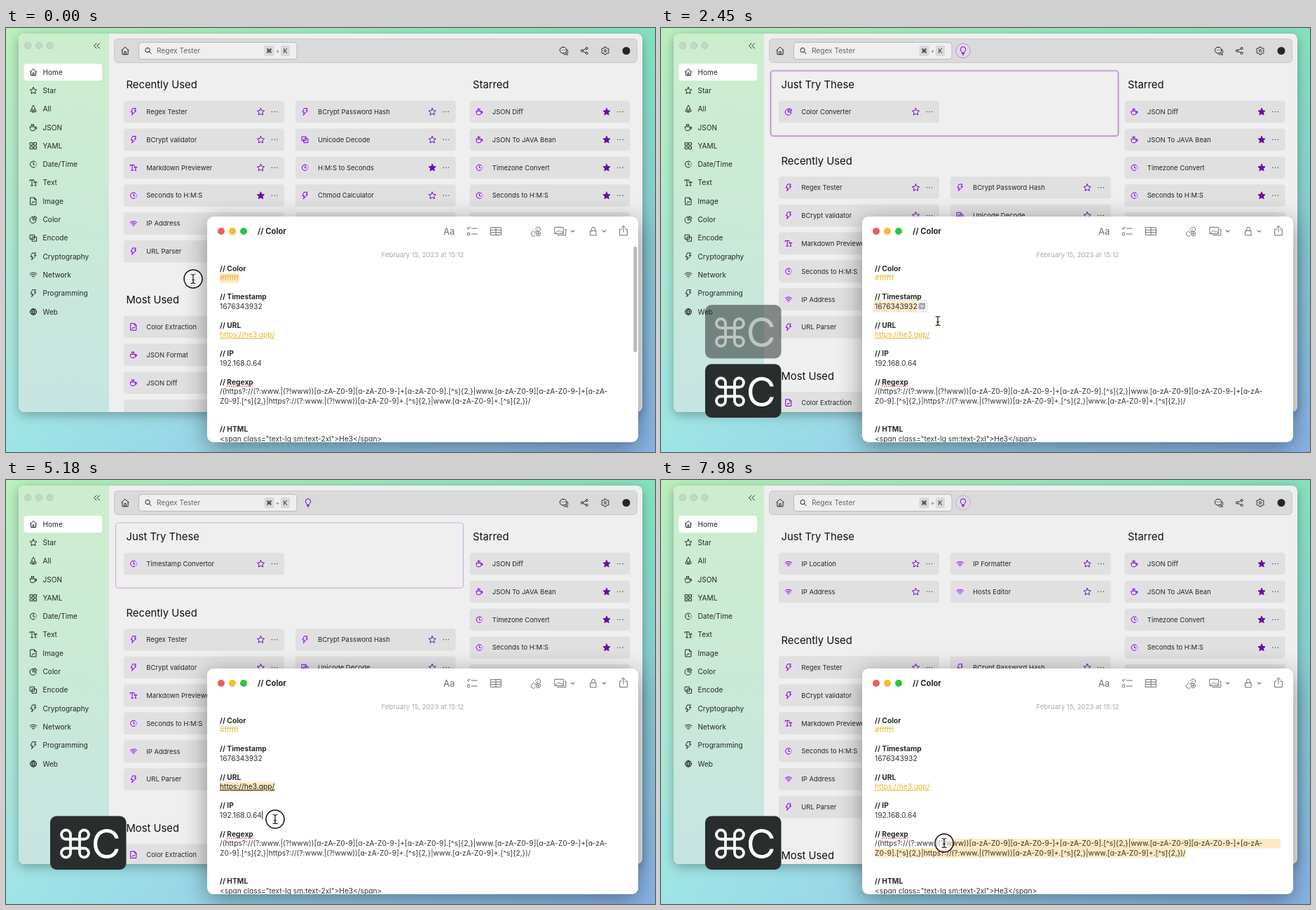
Recreate the animation shown at these times as an HTML page with a canvas. Size 926x605 px, loop 8 s.

```html
<!DOCTYPE html>
<html lang="en">
<head>
<meta charset="utf-8">
<title>Clipboard suggestions</title>
<style>
  html, body { margin: 0; width: 100%; height: 100%; overflow: hidden; }
  canvas, svg { position: absolute; left: 0; top: 0; width: 926px; height: 605px; display: block; }
  svg text { font: 10.24px Inter, sans-serif; font-feature-settings: "cv11"; fill: #333; white-space: pre; }
  svg .head { font-weight: 700; font-feature-settings: normal; fill: #2a2a2a; }
</style>
</head>
<body>
<canvas id="stage" width="926" height="605"></canvas>
<svg id="note" viewBox="0 0 926 605">
  <clipPath id="page"><rect x="287" y="269" width="615" height="322" rx="9"/></clipPath>
  <g id="lines" clip-path="url(#page)"></g>
  <g id="pointer">
    <circle r="13" fill="#fff" fill-opacity=".55" stroke="#111" stroke-width="1.5"/>
    <g fill="none" stroke-linecap="round">
      <path d="M-3-6.5Q0-6.5 0-4.5Q0-6.5 3-6.5M0-5V5M-3 6.5Q0 6.5 0 4.5Q0 6.5 3 6.5" stroke="#fff" stroke-width="2.6"/>
      <path d="M-3-6.5Q0-6.5 0-4.5Q0-6.5 3-6.5M0-5V5M-3 6.5Q0 6.5 0 4.5Q0 6.5 3 6.5M-1.5 1.5h3" stroke="#111" stroke-width="1.2"/>
    </g>
  </g>
</svg>
<script>
const W = 926, H = 605, LOOP = 8000, STEP = 70;
const ctx = document.getElementById('stage').getContext('2d');
const PURPLE = '#6a0dad', INK = '#262626';

const ICONS = {
  home: 'M3 11 12 3l9 8M5 10v11h14V10M10 21v-7h4v7',
  star: 'M12 2.5l2.9 6.2 6.8.8-5 4.6 1.3 6.7L12 17.5l-6 3.3 1.3-6.7-5-4.6 6.8-.8z',
  rocket: 'M12 2c4 4 5 8 4 13H8C7 10 8 6 12 2zM8 11l-4 5v3h16v-3l-4-5M10 19v3m4-3v3',
  mug: 'M3 10h14v6c0 3-2 5-5 5H8c-3 0-5-2-5-5zM17 11h4v5h-4M7 3v4m3-4v4m3-4v4',
  grid: 'M3 3h7v7H3zM14 3h7v7h-7zM3 14h7v7H3zM14 14h7v7h-7z',
  clock: 'M16 20A9 9 0 1 1 18 5.3M12 7v6h4M21 9v.1M21.5 13v.1M20 17v.1',
  text: 'M2 7V4h12v3M8 4v16M5 20h6M14 12v-2h8v2M18 10v10M16 20h4',
  file: 'M4 2h11l5 5v15H4zM15 2v5h5M8 18l3-5 2 3 3-4',
  pie: 'M11 4a9 9 0 1 0 9 9h-9zM15 2a8 8 0 0 1 7 7h-7z',
  copy: 'M3 3h12v12H3zM9 9h12v12H9z',
  bolt: 'M10 2h9l-4 7h5L7 22l3-9H5z',
  wifi: 'M2 9a15 15 0 0 1 20 0M5 13a10 10 0 0 1 14 0M8.5 16.5a5 5 0 0 1 7 0M12 20h.1',
  globe: 'M12 3a9 9 0 1 0 0 18a9 9 0 0 0 0-18zM3 12h18M12 3c-5 6-5 12 0 18c5-6 5-12 0-18M5 7h14M5 17h14',
  search: 'M10 3a7 7 0 1 0 0 14a7 7 0 0 0 0-14zM15 15l6 6',
  bulb: 'M9 17c0-3-4-4-4-9a7 7 0 0 1 14 0c0 5-4 6-4 9zM9 20h6M11 23h2',
  chat: 'M10 3a8 7.5 0 1 0 4 14l4 1-1-3a8 7.5 0 0 0-7-12M20 9c3 4 2 8 0 10l1 3-4-1c-3 1-5 0-7-2M7 10h.1M10.500 10h.1M14 10h.1',
  share: 'M18 2.500a3 3 0 1 0 0 6a3 3 0 0 0 0-6M18 15.500a3 3 0 1 0 0 6a3 3 0 0 0 0-6M5 9a3 3 0 1 0 0 6a3 3 0 0 0 0-6M8 10.500l7-4M8 13.500l7 4',
  gear: 'M10 2h4l1 3 2 1 3-1 2 4-2 2v2l2 2-2 4-3-1-2 1-1 3h-4l-1-3-2-1-3 1-2-4 2-2v-2L2 9l2-4 3 1 2-1zM12 9a3 3 0 1 0 0 6a3 3 0 0 0 0-6',
  cmd: 'M9 9h6v6H9zM9 9V6a3 3 0 1 0-3 3zM15 9h3a3 3 0 1 0-3-3zM15 15v3a3 3 0 1 0 3-3zM9 15H6a3 3 0 1 0 3 3z',
  collapse: 'M11 5l-7 7 7 7M20 5l-7 7 7 7',
  chevron: 'M6 9l6 6 6-6',
  list: 'M5 3l-3 3 2 2 4-5M4.500 15a3 3 0 1 0 0 6a3 3 0 0 0 0-6M11 6h12M11 18h12',
  table: 'M1 4h22v16H1zM1 9.300h22M1 14.600h22M12 4v16',
  link: 'M11 7l3-3a5 5 0 0 1 7 7M8 10l-4 4a5 5 0 0 0 6 8M9 15l7-7M17 12a5 5 0 1 0 0 10a5 5 0 0 0 0-10M17 14.500v5M14.500 17h5',
  photo: 'M1 4h17v13H1zM6 20h17V8h-2M2 16l6-6 4 4 2-2 4 4M13 7.500h.1',
  lock: 'M5 11h14v11H5zM8 11V6a4 4 0 0 1 8 0v5',
  upload: 'M8 9H4v13h16V9h-4M12 15V2M8 6l4-4 4 4'
};
const PATHS = Object.fromEntries(Object.entries(ICONS).map(([k, d]) => [k, new Path2D(d)]));

const SIDEBAR = [['home', 'Home'], ['star', 'Star'], ['rocket', 'All'], ['mug', 'JSON'], ['grid', 'YAML'],
  ['clock', 'Date/Time'], ['text', 'Text'], ['file', 'Image'], ['pie', 'Color'], ['copy', 'Encode'],
  ['bolt', 'Cryptography'], ['wifi', 'Network'], ['bolt', 'Programming'], ['globe', 'Web']];
const RECENT = [
  [['bolt', 'Regex Tester'], ['bolt', 'BCrypt validator'], ['text', 'Markdown Previewer'],
    ['clock', 'Seconds to H:M:S', true], ['wifi', 'IP Address'], ['bolt', 'URL Parser']],
  [['bolt', 'BCrypt Password Hash'], ['copy', 'Unicode Decode'], ['clock', 'H:M:S to Seconds', true],
    ['bolt', 'Chmod Calculator'], ['', '']]];
const MOST = [[['file', 'Color Extraction'], ['mug', 'JSON Format'], ['mug', 'JSON Diff'], ['', '']]];
const STARRED = [['mug', 'JSON Diff', true], ['mug', 'JSON To JAVA Bean', true],
  ['clock', 'Timezone Convert', true], ['clock', 'Seconds to H:M:S', true], ['', '']];

// Suggestions shown from each time on
const RESULTS = [
  { at: 1260, columns: [[['pie', 'Color Converter']]] },
  { at: 3400, columns: [[['clock', 'Timestamp Convertor']]] },
  { at: 5600, columns: [[['bolt', 'URL Parser'], ['copy', 'URL Decode']],
    [['copy', 'Generate QR Code for URL'], ['copy', 'URL Encode']]] },
  { at: 7420, columns: [[['wifi', 'IP Location'], ['wifi', 'IP Address']],
    [['wifi', 'IP Formatter'], ['wifi', 'Hosts Editor']]] }];
const COPIES = [240, 2320, 4090, 6510];
const POINTER = [[0, 267, 358], [250, 267, 358], [800, 397, 402], [980, 379, 398], [1400, 379, 398],
  [1750, 297, 398], [2100, 297, 398], [2450, 395, 418], [2750, 390, 440], [2950, 390, 440], [3300, 300, 440],
  [3500, 300, 440], [3900, 361, 445], [4400, 361, 445], [5000, 384, 484], [5300, 384, 484], [5750, 297, 481],
  [6550, 297, 481], [7250, 752, 533], [7420, 765, 535], [7660, 765, 535], [7960, 404, 518]];
const PRESSED = [[0, 210], [1400, 1850], [2900, 3400], [5110, 5900], [7630, LOOP]];

const clamp = v => Math.max(0, Math.min(1, v));
const ramp = (t, a, b) => { const k = clamp((t - a) / (b - a)); return k * k * (3 - 2 * k); };
const during = (t, a, b) => t >= a && t < b;
const mix = (a, b, k) => `rgb(${a.map((v, i) => Math.round(v + (b[i] - v) * k))})`;

function pointerAt(t) {
  const i = POINTER.findIndex(p => p[0] > t);
  if (i < 0) return POINTER.at(-1).slice(1);
  const [t0, x0, y0] = POINTER[i - 1], [t1, x1, y1] = POINTER[i], k = ramp(t, t0, t1);
  return [x0 + (x1 - x0) * k, y0 + (y1 - y0) * k];
}

function box(x, y, w, h, r, fill, stroke, width = 1) {
  ctx.beginPath();
  ctx.roundRect(x, y, w, h, r);
  if (fill) { ctx.fillStyle = fill; ctx.fill(); }
  if (stroke) { ctx.strokeStyle = stroke; ctx.lineWidth = width; ctx.stroke(); }
}
function dot(x, y, r, fill, stroke) {
  box(x - r, y - r, 2 * r, 2 * r, r, fill, stroke);
}
function label(text, x, y, size, color = INK, weight = 400) {
  ctx.font = `${weight} ${size}px Inter, sans-serif`;
  ctx.fillStyle = color;
  ctx.fillText(text, x, y + size * 0.36);
}
function icon(name, x, y, size, color = INK, filled = false, weight = 1) {
  ctx.save();
  ctx.translate(x - size / 2, y - size / 2);
  ctx.scale(size / 24, size / 24);
  ctx.lineWidth = weight * 24 / size;
  ctx.lineJoin = ctx.lineCap = 'round';
  ctx.strokeStyle = ctx.fillStyle = color;
  if (filled) ctx.fill(PATHS[name]);
  ctx.stroke(PATHS[name]);
  ctx.restore();
}
function shadow(alpha, blur, dy) {
  ctx.shadowColor = `rgba(0,0,0,${alpha})`;
  ctx.shadowBlur = blur;
  ctx.shadowOffsetY = dy;
}

function makeBackdrop() {
  const canvas = document.createElement('canvas');
  canvas.width = W; canvas.height = H;
  const c = canvas.getContext('2d');
  for (let x = 0; x < W; x += 2) {
    const g = c.createLinearGradient(0, 0, 0, H), k = x / W;
    g.addColorStop(0, mix([186, 240, 190], [132, 226, 190], k));
    g.addColorStop(1, mix([158, 228, 232], [138, 178, 232], k));
    c.fillStyle = g;
    c.fillRect(x, 0, 2, H);
  }
  return canvas;
}
const backdrop = makeBackdrop();

function card(x, y, [name, title, starred]) {
  box(x, y - 15.8, 229, 31.6, 4, '#e0e0e0');
  if (!title) return;
  dot(x + 14, y, 8.8, '#e8dbef');
  icon(name, x + 14, y, 11.5, PURPLE);
  label(title, x + 32.3, y, 9.45);
  icon('star', x + 195.5, y, 12.5, PURPLE, starred);
  for (let i = -1; i < 2; i++) dot(x + 215 + i * 3.6, y, 0.75, '#444');
}
function heading(title, x, y) {
  label(title, x, y, 14.8, '#111');
}
function section(title, y, columns) {
  heading(title, 171.5, y);
  columns.forEach((cards, c) => cards.forEach((item, r) => card(168 + c * 244.7, y + 38.5 + r * 39.85, item)));
}

function drawSidebar() {
  const g = ctx.createLinearGradient(0, 8, 0, 548);
  g.addColorStop(0, '#cdeecd');
  g.addColorStop(1, '#c6e5e2');
  ctx.fillStyle = g;
  ctx.fillRect(18, 8, 129, 540);
  for (const x of [31, 47, 62.5]) dot(x, 25, 4.7, '#c0d9c3', '#b2cbb6');
  icon('collapse', 129.5, 25.5, 12);
  box(25.5, 51, 111.5, 24, 4, '#fff');
  SIDEBAR.forEach(([name, title], i) => {
    const y = 63 + i * 26.3;
    icon(name, 39, y, 12);
    label(title, 52.5, y, 10.1);
  });
}

function drawToolbar(t) {
  box(154.5, 15.5, 746, 34, 5, '#dadada', '#c9c9c9');
  icon('home', 170, 32.5, 14);
  box(189.5, 20.5, 225.5, 24, 4, '#efefef', '#b9b9b9');
  icon('search', 203, 32.5, 11);
  label('Regex Tester', 215, 32.5, 10.1, '#666');
  box(368.5, 25, 14, 15, 2, '#d9d9d9');
  icon('cmd', 375.5, 32.5, 8);
  label('+', 384.5, 32.5, 9, '#777');
  box(392, 25, 13, 15, 2, '#d9d9d9');
  label('K', 395.5, 32.5, 9);
  icon('chat', 796, 32.5, 14);
  icon('share', 825.5, 32.5, 12.5);
  icon('gear', 855, 32.5, 13);
  dot(885, 32.5, 5.5, INK);
  if (t < RESULTS[0].at) return;
  ctx.globalAlpha = ramp(t, 1460, 1700) - ramp(t, 4400, 4760) + ramp(t, 5620, 5850) - 0.4 * ramp(t, 7650, 7980);
  dot(431, 32.5, 10.3, '#e5d6ec', '#b98fcb');
  ctx.globalAlpha = 1;
  icon('bulb', 431, 32.5, 12.5, PURPLE);
}

function pulse(t) {
  const start = during(t, 1330, 4130) ? 1330 : during(t, 5040, 7140) ? 5040 : t;
  return Math.sin(Math.PI * (t - start) / 700) ** 2;
}

function drawApp(t) {
  ctx.save();
  shadow(0.3, 16, 4);
  box(18, 8, 890, 540, 8, '#efefef');
  ctx.restore();
  ctx.save();
  ctx.beginPath();
  ctx.roundRect(18, 8, 890, 540, 8);
  ctx.clip();
  const result = RESULTS.findLast(r => t >= r.at);
  let shift = 0;
  if (result) {
    const rows = result.columns[0].length, glow = pulse(t);
    shift = 68.5 + 39.7 * rows;
    section('Just Try These', 81, result.columns);
    if (glow > 0.01) {
      ctx.save();
      ctx.shadowColor = `rgba(170,110,200,${0.5 * glow * glow})`;
      ctx.shadowBlur = 3 * glow;
      box(156.5, 61, 496, 53.3 + 39.9 * rows, 4, null, `rgba(178,125,202,${Math.min(1, glow * 1.6)})`, 1.2);
      ctx.restore();
    }
  }
  section('Recently Used', 81 + shift, RECENT);
  section('Most Used', 388 + shift, MOST);
  heading('Starred', 666, 81);
  STARRED.forEach((item, r) => card(661.5, 119.5 + r * 39.85, item));
  drawSidebar();
  drawToolbar(t);
  ctx.restore();
}

function drawKey(y, alpha) {
  ctx.globalAlpha = alpha;
  box(63, y, 108.5, 76.5, 9, '#292d2d');
  icon('cmd', 98.5, y + 39.5, 52, '#fff', false, 3.8);
  label('C', 121.5, y + 39.5, 58, '#fff');
  ctx.globalAlpha = 1;
}
function drawKeys(t) {
  COPIES.forEach((at, i) => {
    const age = t - at;
    if (age < 0 || age > 2370) return;
    const raised = t >= (COPIES[i + 1] ?? Infinity);
    drawKey(raised ? 395 : 479.5, 1 - clamp((age - 2070) / 300));
  });
}

function drawNoteWindow(t) {
  ctx.save();
  shadow(0.4, 34, 8);
  box(287, 269, 615, 322, 9, '#fff');
  ctx.restore();
  ['#ed5f56', '#f7bb2e', '#2cc440'].forEach((c, i) => dot(307 + 16 * i, 290, 5, c));
  label('// Color', 359, 290, 11.2, '#2a2a2a', 700);
  const gray = '#6d6d6d';
  label('Aa', 624, 290, 13, gray);
  icon('list', 665, 290, 16, gray);
  icon('table', 699, 290, 16, gray);
  icon('link', 756, 290, 16, gray);
  icon('photo', 791, 290, 17, gray);
  icon('chevron', 808.5, 290, 9, gray, false, 1.2);
  icon('lock', 838, 290, 14, gray);
  icon('chevron', 853.5, 290, 9, gray, false, 1.2);
  icon('upload', 881, 289, 16, gray);
  if (t < STEP) box(895.3, 312, 5, 150.5, 2.5, '#b9b9b9');
}

// Note text: line index on a 13.5 px pitch
const LEFT = 305, lineY = n => 343 + 13.5 * n;
const linesGroup = document.getElementById('lines');
function addText(content, x, y, className = '') {
  const el = document.createElementNS('http://www.w3.org/2000/svg', 'text');
  el.setAttribute('x', x);
  el.setAttribute('y', y + 3.6);
  el.setAttribute('class', className);
  el.textContent = content;
  return linesGroup.appendChild(el);
}
const addLine = (n, content, className) => addText(content, LEFT, lineY(n), className);
[['Color', 0], ['Timestamp', 3], ['URL', 6], ['IP', 9], ['Regexp', 12], ['HTML', 17]]
  .forEach(([name, n]) => addLine(n, '// ' + name, 'head'));
const hex = addLine(1, '#ffffff'), stamp = addLine(4, '1676343932'), url = addLine(7, 'https://he3.app/');
const ip = addLine(10, '192.168.0.64');
addLine(13, '/(https?://(?:www.|(?!www))[a-zA-Z0-9][a-zA-Z0-9-]+[a-zA-Z0-9].[^s]{2,}|www.[a-zA-Z0-9][a-zA-Z0-9-]+[a-zA-');
const regexEnd = addLine(14, 'Z0-9].[^s]{2,}|https?://(?:www.|(?!www))[a-zA-Z0-9]+.[^s]{2,}|www.[a-zA-Z0-9]+.[^s]{2,})/');
addLine(18, '<span class="text-lg sm:text-2xl">He3</span>');
const date = addText('February 15, 2023 at 15:12', 594.5, 323);
date.style.cssText = 'font-size:9.6px;text-anchor:middle;fill:#a8a8a8;font-feature-settings:normal';
hex.style.fill = '#e6b32e';
url.style.textDecoration = 'underline';

const endOf = el => LEFT + el.getComputedTextLength();
function highlight(n, from, to) {
  ctx.fillStyle = '#fde9c2';
  ctx.fillRect(from, lineY(n) - 6.5, Math.max(0, to - from), 13.5);
}
function caret(el, n) {
  ctx.fillStyle = '#222';
  ctx.fillRect(endOf(el) + 0.3, lineY(n) - 6, 1, 12);
}
function dragSelect(el, n, t, a, b) {
  const end = endOf(el);
  highlight(n, end + (LEFT - end) * ramp(t, a, b), end);
}

function drawSelection(t, x, y) {
  if (t < 1050) highlight(1, LEFT, endOf(hex));
  if (during(t, 1050, 1450)) caret(stamp, 4);
  if (during(t, 1450, 2900)) dragSelect(stamp, 4, t, 1450, 1750);
  if (during(t, 2380, 2600)) {
    const end = endOf(stamp);
    ctx.setLineDash([2, 1.5]);
    box(304, 388.5, end - 304 + 14, 16.5, 1, null, '#aaa', 0.8);
    ctx.setLineDash([]);
    box(end + 2, 392, 9.5, 9.5, 2, '#a9a9a9');
    icon('chevron', end + 6.7, 397, 7, '#fff', false, 1.2);
  }
  const urlSelected = during(t, 2950, 5250);
  if (urlSelected) dragSelect(url, 7, t, 2950, 3300);
  url.style.fill = urlSelected ? '#1c1c1c' : '#e6b32e';
  if (during(t, 5110, 5320)) caret(ip, 10);
  if (during(t, 5320, 7630)) dragSelect(ip, 10, t, 5300, 5750);
  if (t >= 7630) {
    const onFirst = y < 525.5;
    if (onFirst) highlight(13, x, 884);
    highlight(14, onFirst ? LEFT : x, endOf(regexEnd));
  }
  ctx.setLineDash([1.5, 1.5]);
  ctx.strokeStyle = '#e0453c';
  ctx.lineWidth = 1.3;
  ctx.beginPath();
  ctx.moveTo(315, 511);
  ctx.lineTo(352, 511);
  ctx.stroke();
  ctx.setLineDash([]);
}

const pointer = document.getElementById('pointer');
function render(now) {
  const t = Math.floor(now % LOOP / STEP) * STEP;
  const [x, y] = pointerAt(t);
  ctx.drawImage(backdrop, 0, 0);
  drawApp(t);
  drawNoteWindow(t);
  drawSelection(t, x, y);
  drawKeys(t);
  pointer.setAttribute('transform', `translate(${x} ${y})`);
  pointer.firstElementChild.style.display = PRESSED.some(([a, b]) => during(t, a, b)) ? '' : 'none';
}

let start;
function tick(now) {
  start ??= now;
  render(Math.max(0, now - start));
  requestAnimationFrame(tick);
}
requestAnimationFrame(tick);
</script>
</body>
</html>
```
